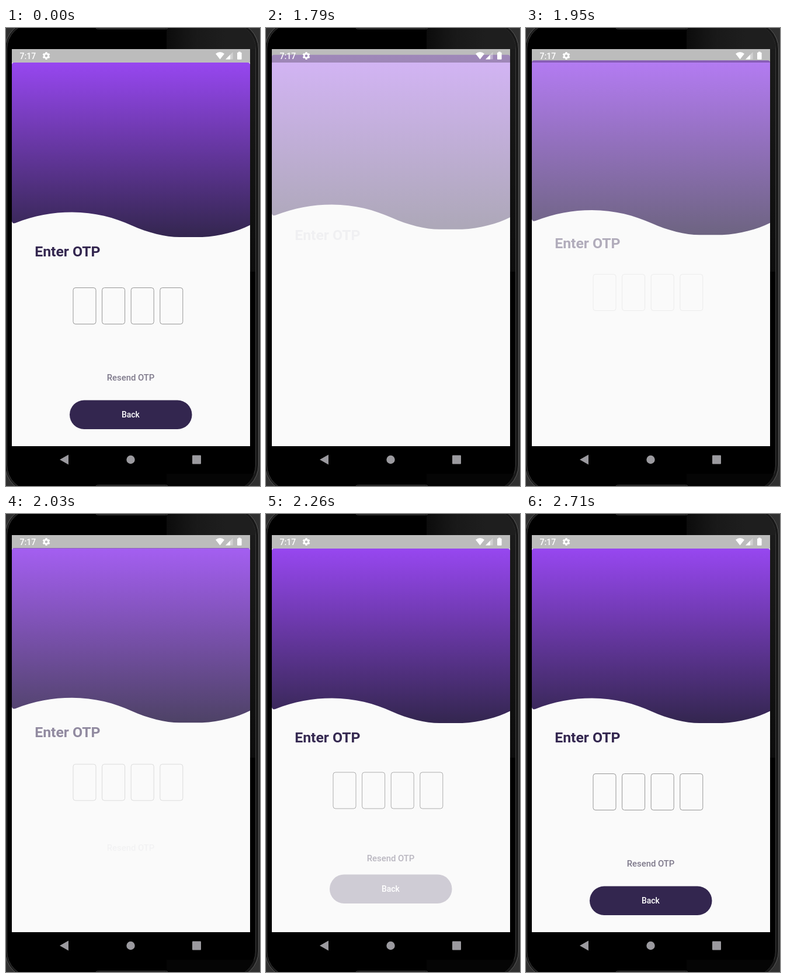
These frames come from a looping animation (435 by 782 pixels, 2.79 s). An HTML page with a canvas:

```html
<!DOCTYPE html>
<html lang="en">
<head>
<meta charset="utf-8">
<title>Enter OTP</title>
<style>
  html, body { margin: 0; width: 100%; height: 100%; overflow: hidden; background: #000; }
  canvas { display: block; width: 435px; height: 782px; }
</style>
</head>
<body>
<canvas id="stage"></canvas>
<script>
const W = 435, H = 782, LOOP = 2790;
const INK = '#33264f', PAPER = '#fafafa';
const TICKS = [1640, 1790, 1870, 1950, 2030, 2100, 2180, 2260, 2330, 2410, 2480, 2560, 2630, 2710];
const FADE = 500, RISE = 29.8;
const START = { header: 1596, title: 1766, boxes: 1877, resend: 1998, button: 2153 };

const canvas = document.getElementById('stage');
const c = canvas.getContext('2d');
const dpr = window.devicePixelRatio || 1;
canvas.width = W * dpr;
canvas.height = H * dpr;
c.scale(dpr, dpr);

// cubic-bezier(0, 0, .58, 1)
function easeOut(x) {
  let lo = 0, hi = 1;
  for (let i = 0; i < 24; i++) {
    const u = (lo + hi) / 2;
    if (1.74 * (1 - u) * u * u + u * u * u < x) lo = u; else hi = u;
  }
  return lo * lo * (3 - 2 * lo);
}

function gradient(x0, y0, x1, y1, ...stops) {
  const g = c.createLinearGradient(x0, y0, x1, y1);
  stops.forEach((s, i) => g.addColorStop(i / (stops.length - 1), s));
  return g;
}

function rect(x, y, w, h, fill) {
  c.fillStyle = fill;
  c.fillRect(x, y, w, h);
}

function round(x, y, w, h, r, fill, stroke) {
  c.beginPath();
  c.roundRect(x, y, w, h, r);
  if (fill) { c.fillStyle = fill; c.fill(); }
  if (stroke) { c.strokeStyle = stroke; c.lineWidth = 1; c.stroke(); }
}

function poly(fill, ...p) {
  c.beginPath();
  for (let i = 0; i < p.length; i += 2) c.lineTo(p[i], p[i + 1]);
  c.closePath();
  c.fillStyle = fill;
  c.fill();
}

function disc(x, y, r, fill) {
  c.beginPath();
  c.arc(x, y, r, 0, 7);
  c.fillStyle = fill;
  c.fill();
}

function text(str, x, y, size, weight, fill, align = 'left') {
  c.font = `${weight} ${size}px Roboto, sans-serif`;
  c.textAlign = align;
  c.fillStyle = fill;
  c.fillText(str, x, y);
}

function phone() {
  rect(0, 0, W, H, '#303030');
  round(-1.5, -11, 434, 804, 47, '#181818', '#5a5a5a');
  round(1.5, -8, 426, 798, 44, '#000', '#3c3c3c');
  c.save();
  c.clip();
  rect(275, 0, 152, 36, gradient(275, 0, 427, 0, '#0c0c0c', '#191919', '#1e1e1e', '#1e1e1e'));
  rect(418, 36, 9, 380, gradient(0, 36, 0, 416, '#1b1b1b', '#0c0c0c'));
  rect(275, 761, 152, 21, '#050505');
  c.restore();
  round(152.5, -9.5, 126, 11, 5, '#0a0a0a', '#4a4a4a');
  round(152.5, 780.5, 126, 11, 5, '#0a0a0a', '#4a4a4a');
  rect(10, 36, 408, 678, PAPER);
  rect(10, 714, 408, 47, '#000');

  const grey = '#9b9a9f';
  poly(grey, 92, 737, 107, 728.6, 107, 745.4);
  disc(213.5, 737, 7.2, grey);
  round(319, 729.5, 15, 15, 1, grey);
}

function statusBar() {
  rect(10, 36, 408, 23, 'rgba(0,0,0,.25)');
  text('7:17', 23.6, 53, 14, 500, '#fff');

  // gear
  c.save();
  c.translate(69, 47.5);
  c.beginPath();
  c.arc(0, 0, 5, 0, 7);
  c.moveTo(2.3, 0);
  c.arc(0, 0, 2.3, 0, 7, true);
  c.fillStyle = '#fff';
  c.fill('evenodd');
  c.rotate(Math.PI / 6);
  for (let i = 0; i < 6; i++) {
    c.rotate(Math.PI / 3);
    rect(4, -1.6, 2.4, 3.2, '#fff');
  }
  c.restore();

  // wifi
  c.beginPath();
  c.moveTo(366.5, 53.5);
  c.lineTo(359, 44);
  c.quadraticCurveTo(366.5, 38.2, 374, 44);
  c.closePath();
  c.fillStyle = '#fff';
  c.fill();

  // signal
  poly('rgba(255,255,255,.35)', 376, 53.5, 388.5, 53.5, 388.5, 41);
  poly('#fff', 376, 53.5, 384, 53.5, 384, 45.5);

  // battery
  rect(398, 40.5, 3.6, 2, '#fff');
  round(396, 41.8, 7.6, 12, 1, '#fff');
}

function wave() {
  c.moveTo(16, 333);
  c.bezierCurveTo(48, 320.3, 80, 314.6, 113, 314.6);
  c.bezierCurveTo(152, 314.6, 186, 324, 215, 337);
  c.bezierCurveTo(243, 349.5, 273, 357, 297, 357);
  c.lineTo(336, 357);
  c.bezierCurveTo(366, 355.5, 396, 347.5, 418, 336.5);
}

function header() {
  c.beginPath();
  wave();
  c.lineTo(418, 63);
  c.quadraticCurveTo(418, 59, 414, 59);
  c.lineTo(14, 59);
  c.quadraticCurveTo(10, 59, 10, 63);
  c.lineTo(10, 330);
  c.quadraticCurveTo(11, 334.5, 16, 333);
  c.closePath();
  c.fillStyle = gradient(0, 59, 0, 357, '#9747f0', INK);
  c.fill();
}

function title() {
  text('Enter OTP', 49.2, 389.8, 24.8, 700, INK);
}

function boxes() {
  for (let i = 0; i < 4; i++) round(115 + 49.6 * i, 443.5, 39, 62, 4, null, '#969696');
}

function resend() {
  text('Resend OTP', 213.5, 602, 14.9, 500, '#7d788a', 'center');
}

function button() {
  round(109, 635.5, 209.5, 49.5, 24.75, INK);
  c.globalAlpha = 1;   // label stays white through the fade
  text('Back', 213.3, 665, 13.9, 500, '#fff', 'center');
}

function reveal(part, t, start) {
  const p = Math.min(1, (t - start) / FADE);
  if (p <= 0) return;
  c.save();
  c.globalAlpha = p;
  c.translate(0, -RISE * (1 - easeOut(p)));
  part();
  c.restore();
}

function draw(now) {
  const t = now % LOOP;
  let shown = LOOP;                       // finished screen before the first tick
  for (const k of TICKS) if (t >= k) shown = k;
  if (shown === TICKS[0]) shown = 0;      // blank page just after opening
  c.clearRect(0, 0, W, H);
  phone();
  reveal(header, shown, START.header);
  reveal(title, shown, START.title);
  reveal(boxes, shown, START.boxes);
  reveal(resend, shown, START.resend);
  reveal(button, shown, START.button);
  statusBar();
}

const began = performance.now();
function loop() {
  draw(performance.now() - began);
  requestAnimationFrame(loop);
}
loop();
</script>
</body>
</html>
```
